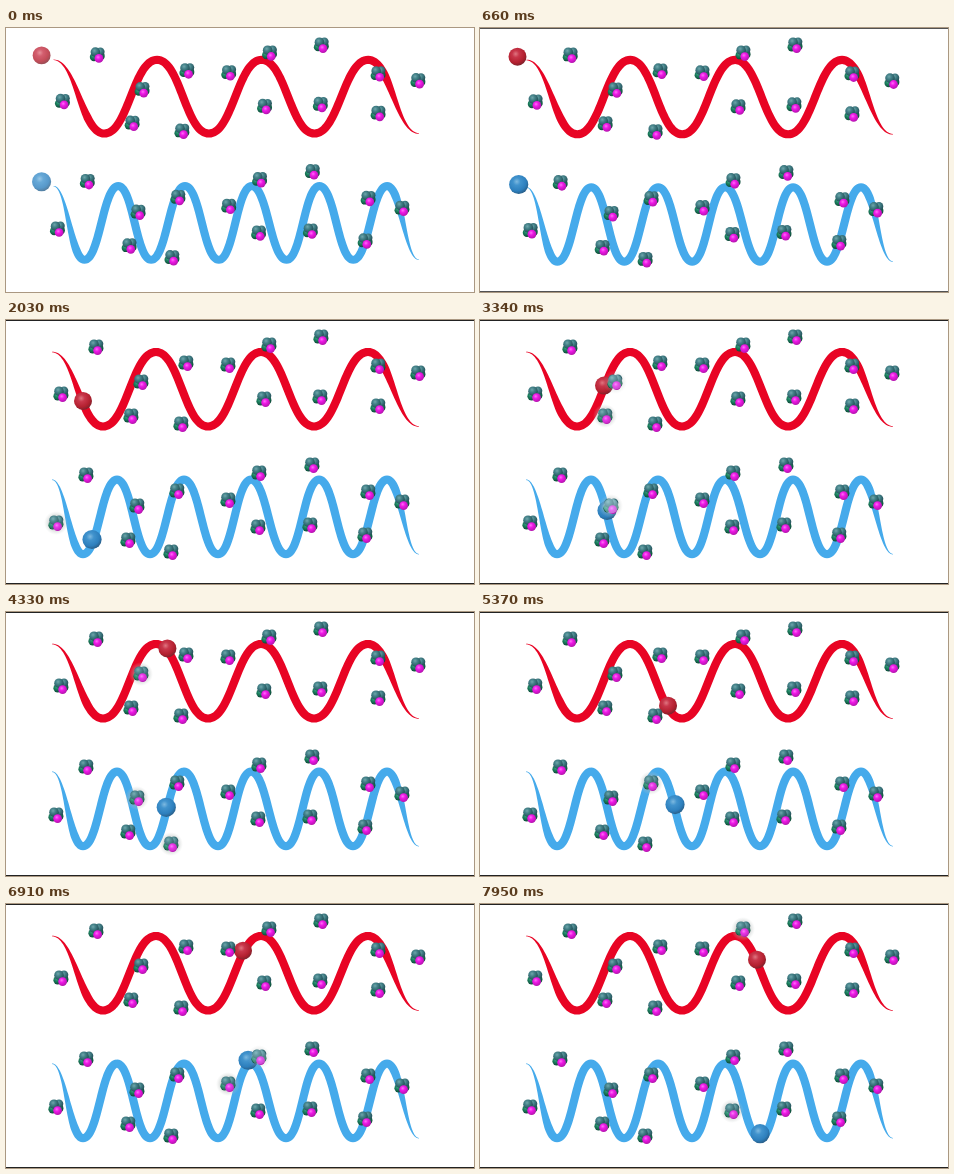
An HTML page for the animation above (8000 ms loop, 468 px wide and 264 px high).

```html
<!DOCTYPE html>
<html lang="en">
<head>
<meta charset="utf-8">
<title>Two waves</title>
<style>
html, body { margin: 0; width: 100%; height: 100%; overflow: hidden; background: #fff; }
svg { display: block; width: 100vw; height: 100vh; }
</style>
</head>
<body>
<svg id="stage" viewBox="0 0 468 264">
  <defs>
    <radialGradient id="redBall" cx=".4" cy=".35" r=".65">
      <stop offset="0" stop-color="#df7580"/><stop offset=".3" stop-color="#c8364a"/>
      <stop offset=".75" stop-color="#b3202f"/><stop offset="1" stop-color="#82222c"/>
    </radialGradient>
    <radialGradient id="blueBall" cx=".4" cy=".35" r=".65">
      <stop offset="0" stop-color="#7db9e0"/><stop offset=".3" stop-color="#4193cd"/>
      <stop offset=".75" stop-color="#2d7fbd"/><stop offset="1" stop-color="#2a618c"/>
    </radialGradient>
    <radialGradient id="teal" cx=".4" cy=".35" r=".65">
      <stop offset="0" stop-color="#6fa6ab"/><stop offset=".4" stop-color="#428087"/><stop offset="1" stop-color="#234f57"/>
    </radialGradient>
    <radialGradient id="green" cx=".4" cy=".35" r=".65">
      <stop offset="0" stop-color="#3da585"/><stop offset=".4" stop-color="#1c8260"/><stop offset="1" stop-color="#0d4a38"/>
    </radialGradient>
    <radialGradient id="pink" cx=".4" cy=".35" r=".65">
      <stop offset="0" stop-color="#ff70f8"/><stop offset=".4" stop-color="#ee18e6"/><stop offset="1" stop-color="#b414ae"/>
    </radialGradient>
    <radialGradient id="halo">
      <stop offset=".5" stop-color="#a2aaa8" stop-opacity=".55"/><stop offset="1" stop-color="#c5cbc9" stop-opacity="0"/>
    </radialGradient>
    <g id="cluster">
      <circle cx="3.4" cy="1.2" r="4" fill="url(#green)"/>
      <circle cx="-3.4" cy="2.2" r="4.2" fill="url(#green)"/>
      <circle cx="3" cy="-3.2" r="4.3" fill="url(#teal)"/>
      <circle cx="-2" cy="-2.8" r="4.8" fill="url(#teal)"/>
      <circle cx="1.6" cy="3.6" r="4.4" fill="url(#pink)"/>
    </g>
  </defs>
  <rect width="468" height="264" fill="#fff"/>
  <g id="scene"></g>
  <path id="edges" d="M0 .5H468M0 263.5H468" stroke="#222"/>
</svg>
<script>
const LOOP = 8000, NS = 'http://www.w3.org/2000/svg';
const scene = document.getElementById('scene');
const edges = document.getElementById('edges');
const times = [1210, 2030, 3340, 5370, 6910, 7950];
const LEAD = -13.4;

const waves = [
  { color: '#e80424', ball: 'redBall', r: 9, lift: 2.4, top: 32, bottom: 106.5,
    turns: [46, 97, 150, 202, 255, 308, 362, 413],
    stops: [60, 77, 124, 188, 237, 277],
    clusters: [[90, 27], [55, 74], [135, 62], [125, 96], [175, 104], [180, 43], [222, 45],
      [263, 25], [315, 17], [258, 79], [314, 77], [372, 46], [372, 86], [412, 53]] },
  { color: '#45aaeb', ball: 'blueBall', r: 9.6, lift: 4.5, top: 159.7, bottom: 234.2,
    turns: [46, 77, 111, 144, 178, 212, 245, 280, 313, 347, 381, 413],
    stops: [59, 86, 127, 195, 242, 280],
    clusters: [[80, 155], [50, 203], [131, 186], [122, 220], [165, 232], [171, 171], [222, 180],
      [253, 153], [306, 145], [252, 207], [304, 205], [362, 172], [359, 215], [396, 182]] }
];

function add(tag, attrs, parent = scene) {
  const el = document.createElementNS(NS, tag);
  for (const k in attrs) el.setAttribute(k, attrs[k]);
  return parent.appendChild(el);
}

// Points along the wave, each with its distance s from the start
function sample({ turns, top, bottom }) {
  const pts = [], K = 0.45, N = 40;
  for (let i = 0; i < turns.length - 1; i++) {
    const x0 = turns[i], dx = turns[i + 1] - x0;
    const y0 = i % 2 ? bottom : top, dy = (i % 2 ? top : bottom) - y0;
    for (let j = i ? 1 : 0; j <= N; j++) {
      const t = j / N, q = 1 - t;
      const x = x0 + dx * (3 * K * t * q * q + 3 * (1 - K) * t * t * q + t ** 3);
      const y = y0 + dy * t * t * (3 - 2 * t);
      const p = pts[pts.length - 1];
      pts.push({ x, y, s: p ? p.s + Math.hypot(x - p.x, y - p.y) : 0 });
    }
  }
  return pts;
}

// Closed ribbon that tapers to a point at both ends
function ribbon(pts) {
  const end = pts[pts.length - 1].s, left = [], right = [];
  pts.forEach((p, i) => {
    const a = pts[Math.max(0, i - 1)], b = pts[Math.min(pts.length - 1, i + 1)];
    const len = Math.hypot(b.x - a.x, b.y - a.y);
    const w = Math.min(8.2, 0.5 + 0.11 * Math.min(p.s, end - p.s)) / 2;
    const nx = -(b.y - a.y) / len * w, ny = (b.x - a.x) / len * w;
    left.push((p.x + nx).toFixed(2) + ' ' + (p.y + ny).toFixed(2));
    right.unshift((p.x - nx).toFixed(2) + ' ' + (p.y - ny).toFixed(2));
  });
  return 'M' + left.concat(right).join('L') + 'Z';
}

function lerpBy(pts, key, out, v) {
  let i = 1;
  while (i < pts.length - 1 && pts[i][key] < v) i++;
  const a = pts[i - 1], b = pts[i];
  return a[out] + (b[out] - a[out]) * (v - a[key]) / (b[key] - a[key]);
}

function travel(w, t) {
  if (t < times[0]) {
    const run = t < 400 ? 0 : t < 1020 ? (t - 400) ** 2 / 1240 : t - 710;
    return LEAD + (w.keys[0].s - LEAD) * run / 500;
  }
  return lerpBy(w.keys, 't', 's', t);
}

function place(w, s) {
  if (s < 0) return [w.turns[0] - 12 * s / LEAD, w.top - 4.5 * s / LEAD];
  const lift = w.lift * Math.min(1, s / 10);
  return [lerpBy(w.pts, 's', 'x', s), lerpBy(w.pts, 's', 'y', s) - lift];
}

const clamp = v => Math.max(0, Math.min(1, v));
const bump = (d, half) => clamp(2 * (1 - Math.abs(d) / half));

for (const w of waves) {
  w.pts = sample(w);
  w.keys = times.map((t, i) => ({ t, s: lerpBy(w.pts, 'x', 's', w.stops[i]) }));
  add('path', { d: ribbon(w.pts), fill: w.color });
  w.dot = add('circle', { r: w.r, fill: `url(#${w.ball})` });
}
for (const w of waves) {
  w.atoms = w.clusters.map(([x, y]) => {
    const g = add('g', { transform: `translate(${x} ${y})` });
    const halo = add('circle', { r: 12, fill: 'url(#halo)' }, g);
    add('use', { href: '#cluster' }, g);
    const flash = add('circle', { r: 7.5, fill: '#d5f3ff' }, g);
    let gap = Infinity, s = 0;
    for (const p of w.pts) {
      const d = Math.hypot(p.x - x, p.y - y);
      if (d < gap) { gap = d; s = p.s; }
    }
    return { x, y, halo, flash, gap, s };
  });
}

function draw(t) {
  const k = clamp(t / 950), z = 1 - k * k * (3 - 2 * k);
  const sx = 1 - 0.0042 * z, sy = 1 - 0.011 * z;
  scene.setAttribute('transform', `translate(${412 * (1 - sx)} ${17 * (1 - sy)}) scale(${sx} ${sy})`);
  edges.setAttribute('opacity', 1 - z);
  for (const w of waves) {
    const s = travel(w, t), [x, y] = place(w, s);
    w.dot.setAttribute('cx', x);
    w.dot.setAttribute('cy', y);
    w.dot.setAttribute('opacity', 0.8 + 0.2 * clamp(t / 300));
    for (const a of w.atoms) {
      // Glow on contact, and once more as the ball moves off
      const d = Math.hypot(a.x - x, a.y - y);
      const touch = clamp((14 - d) / 4);
      const echo = s > a.s && a.gap < 18 ? bump(d - 35, 9) : 0;
      a.halo.setAttribute('opacity', Math.max(0.8 * touch, echo));
      a.flash.setAttribute('opacity', Math.max(0.4 * touch, 0.12 * echo));
    }
  }
}

const start = performance.now();
function tick() {
  draw((performance.now() - start) % LOOP);
  requestAnimationFrame(tick);
}
draw(0);
requestAnimationFrame(tick);
</script>
</body>
</html>
```
